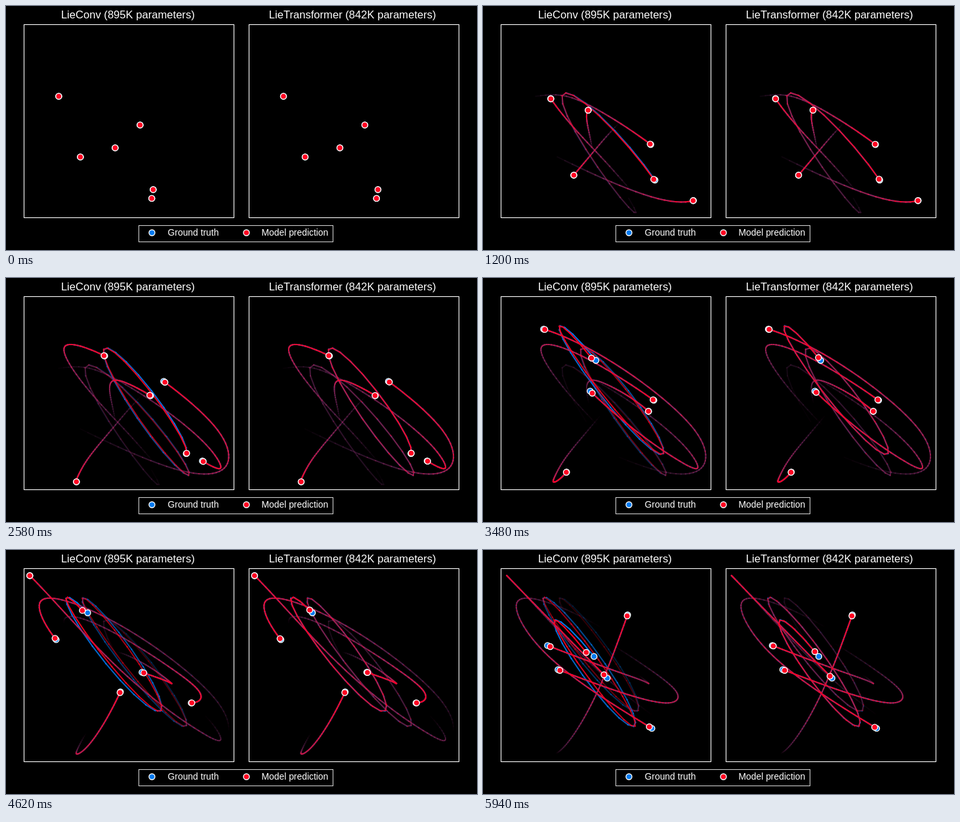
These frames come from a looping animation (718 px wide and 374 px high, 6 s). An HTML page with a canvas:

```html
<!DOCTYPE html>
<html lang="en">
<head>
<meta charset="utf-8">
<title>LieConv and LieTransformer trajectories</title>
<style>
  html, body { margin: 0; width: 100%; height: 100%; overflow: hidden; background: #000; }
  svg, canvas { position: absolute; left: 0; top: 0; width: 718px; height: 374px; }
  text { fill: #fff; font: 13.89px "Liberation Sans", Arial, sans-serif; }
  .title { font-size: 16.6px; text-anchor: middle; }
  .box { fill: none; stroke: #fff; stroke-width: 1.1; }
  .legend { stroke: #ccc; }
  .dot { stroke: #fff; stroke-width: 1.4; }
</style>
</head>
<body>
<canvas id="stage" width="718" height="374"></canvas>
<svg viewBox="0 0 718 374">
  <text class="title" x="185.8" y="19">LieConv (895K parameters)</text>
  <text class="title" x="528.2" y="19">LieTransformer (842K parameters)</text>
  <rect class="box" x="27.5" y="28.5" width="320" height="296"/>
  <rect class="box" x="370.5" y="28.5" width="320" height="296"/>
  <rect class="box legend" x="202.5" y="336.5" width="296" height="25"/>
  <circle class="dot" cx="222.5" cy="347.5" r="4.5" fill="#007af0"/>
  <circle class="dot" cx="366.5" cy="347.5" r="4.5" fill="#ff0022"/>
  <text x="246.5" y="352">Ground truth</text>
  <text x="389.5" y="352">Model prediction</text>
</svg>
<script>
const STEP = 60, STEPS = 100, TRAIL = 50;
const BLUE = '#007af0', RED = '#ff0022';
const ctx = document.getElementById('stage').getContext('2d');

// Natural cubic spline through (t, v) knots
function spline(t, v) {
  const n = t.length, m = Array(n).fill(0), c = Array(n).fill(0);
  for (let i = 1; i < n - 1; i++) {
    const a = t[i] - t[i - 1], b = t[i + 1] - t[i];
    const d = 6 * ((v[i + 1] - v[i]) / b - (v[i] - v[i - 1]) / a);
    const p = 2 * (a + b) - a * c[i - 1];
    c[i] = b / p;
    m[i] = (d - a * m[i - 1]) / p;
  }
  for (let i = n - 2; i > 0; i--) m[i] -= c[i] * m[i + 1];
  return x => {
    let i = 0;
    while (i < n - 2 && x > t[i + 1]) i++;
    const h = t[i + 1] - t[i], a = (t[i + 1] - x) / h, b = 1 - a;
    return a * v[i] + b * v[i + 1]
      + ((a ** 3 - a) * m[i] + (b ** 3 - b) * m[i + 1]) * h * h / 6;
  };
}

// Slow bodies: smooth curves through shared times
const times = [0, 6, 12, 28, 35, 43, 58, 67, 77, 99];
const slow = (xs, ys) => ({ x: spline(times, xs), y: spline(times, ys) });

// Fast body: a cosine between two slowly changing envelopes
function swing(phase, high, low) {
  const hi = spline(high.map((_, i) => i), high);
  const lo = spline(low.map((_, i) => i - .5), low);
  return t => {
    const u = (t - phase) / 20.62, w = (1 + Math.cos(2 * Math.PI * u)) / 2;
    return hi(u) * w + lo(u) * (1 - w);
  };
}

// lag: how far the left model falls behind, per step, in x and y
const bodies = [
  { lag: [.005, .005], ...slow([80, 127, 182, 310, 327, 299, 163, 72, 36, 189],
                               [138, 138, 163, 261, 290, 280, 173, 77, 39, 196]) },
  { lag: [.003, .003], ...slow([204, 184, 163, 119, 109, 107, 127, 149, 174, 220],
                               [182, 204, 229, 285, 304, 312, 297, 265, 217, 99]) },
  { lag: [.008, .008], ...slow([166, 162, 158, 173, 193, 220, 252, 243, 207, 98],
                               [217, 197, 176, 157, 165, 180, 204, 200, 187, 146]) },
  { lag: [.004, .004], ...slow([113, 183, 256, 339, 316, 240, 92, 51, 76, 257],
                               [231, 264, 292, 270, 225, 158, 78, 81, 137, 273]) },
  { lag: [.003, .003], ...slow([224, 186, 145, 88, 104, 150, 260, 295, 282, 114],
                               [281, 238, 194, 108, 102, 119, 187, 218, 234, 183]) },
  { lag: [.006, .0025],
    x: swing(1.5, [232, 279, 275, 237, 232, 245], [110, 120, 148, 116, 91, 108]),
    y: swing(2.55, [317, 302, 270, 247, 270, 294], [165, 133, 107, 73, 72, 107]) }
];

const paths = lagOf => bodies.map(b => {
  const [lx, ly] = lagOf(b);
  return Array.from({ length: STEPS }, (_, s) => [b.x(s * (1 - lx)), b.y(s * (1 - ly))]);
});
const truth = paths(() => [0, 0]);
const left = paths(b => b.lag);
const right = paths(() => [.003, .003]);

function trails(paths, color, now) {
  const n = Math.min(now, TRAIL);
  ctx.strokeStyle = color;
  ctx.lineWidth = 2;
  ctx.lineCap = 'square';
  for (const p of paths) {
    for (let k = 0; k < n; k++) {
      const s = now - n + k;
      ctx.globalAlpha = (k + 1) / n;
      ctx.beginPath();
      ctx.moveTo(...p[s]);
      ctx.lineTo(...p[s + 1]);
      ctx.stroke();
    }
  }
  ctx.globalAlpha = 1;
}

function dots(paths, color, now) {
  ctx.fillStyle = color;
  ctx.strokeStyle = '#fff';
  ctx.lineWidth = 1.4;
  for (const p of paths) {
    ctx.beginPath();
    ctx.arc(...p[now], 4.5, 0, 2 * Math.PI);
    ctx.fill();
    ctx.stroke();
  }
}

function panel(model, offset, now) {
  ctx.setTransform(1, 0, 0, 1, offset + .4, .4);
  trails(truth, BLUE, now);
  trails(model, RED, now);
  dots(truth, BLUE, now);
  dots(model, RED, now);
}

const start = performance.now();
function draw() {
  const now = Math.floor((performance.now() - start) / STEP) % STEPS;
  ctx.setTransform(1, 0, 0, 1, 0, 0);
  ctx.clearRect(0, 0, 718, 374);
  panel(left, 0, now);
  panel(right, 342.6, now);
  requestAnimationFrame(draw);
}
draw();
</script>
</body>
</html>
```
